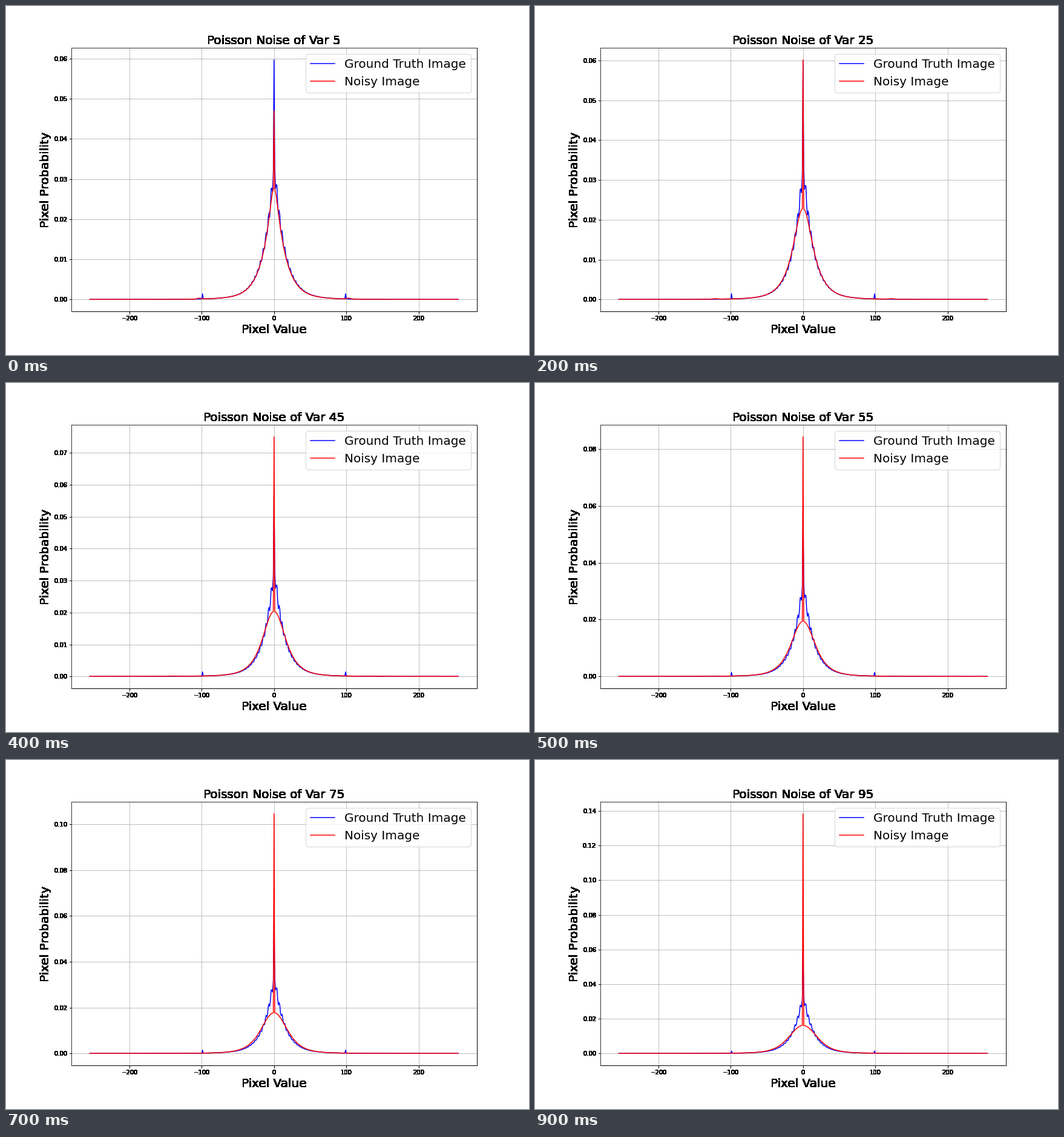
Animation of 864 by 576 pixels, one loop 1 s. Source, as a matplotlib script:

```python
import matplotlib.pyplot as plt
import numpy as np
from matplotlib.animation import FuncAnimation

VARIANCES = range(5, 100, 10)
FRAME_MS = 100
TRUTH_PEAK = .0597

x = np.arange(-255, 256)
dist = np.abs(x)
# Gradient histogram of a natural picture: sharp core plus a faint wide tail.
envelope = .0345 * np.exp(-dist / 14) + .0004 * np.exp(-(dist / 85) ** 2)


def truth_curve():
    ripple = np.cos(2 * np.pi * (dist - .1) / 3.75) * np.exp(-dist / 60)
    curve = envelope * (.985 + .09 * ripple) * (1 + .015 * np.sign(x))
    curve[dist == 99] = .0014
    curve[x == 0] = TRUTH_PEAK
    return curve


def noisy_peak(var):
    """Share of flat pixels, growing roughly exponentially with the noise."""
    keys = [5, 25, 35, 45, 55, 75, 95]
    peaks = [.047, .06017, .067055, .075, .0843, .10457, .1383]
    return np.exp(np.interp(var, keys, np.log(peaks)))


def noisy_curve(var):
    """The truth blurred by noise, with the side spikes spread and pushed out."""
    kernel = np.exp(-(x / (1.32 * np.sqrt(var))) ** 2 / 2)
    body = np.convolve(envelope, kernel, mode="same")
    peak = noisy_peak(var)
    body *= (1 - peak) / body.sum()
    bump = np.exp(-((dist - 99 - .93 * var) / (3 + .1 * var)) ** 2)
    curve = body + .00025 * np.exp(-var / 40) * bump
    curve[x == 0] = peak
    return curve


def harden(image, dpi):
    """Turn every touched pixel fully black, without soft edges."""
    out = np.zeros_like(image)
    out[..., 3] = image[..., 3] > 0
    return out, 0, 0


truth = truth_curve()

plt.rcParams.update({"font.family": "DejaVu Sans", "font.size": 10})
fig, ax = plt.subplots(figsize=(12, 8), dpi=72)
fig.subplots_adjust(left=.125, right=.9, bottom=.125, top=.88)
ax.plot(x, truth, color="blue", label="Ground Truth Image")
noisy_line, = ax.plot(x, truth, color="red", label="Noisy Image")
ax.grid(True)
ax.legend(loc="upper right", fontsize=20)
title = ax.set_title("", fontsize=20)
labels = [ax.set_xlabel("Pixel Value", fontsize=20),
          ax.set_ylabel("Pixel Probability", fontsize=20)]
for artist in [title, *labels, ax.spines["right"], ax.spines["bottom"]]:
    artist.set_agg_filter(harden)


def update(i):
    noisy = noisy_curve(VARIANCES[i])
    noisy_line.set_ydata(noisy)
    top = max(truth.max(), noisy.max())
    ax.set_ylim(-.05 * top, 1.05 * top)
    title.set_text(f"Poisson Noise of Var {VARIANCES[i]}")
    for axis in (ax.xaxis, ax.yaxis):
        for artist in [*axis.get_ticklabels(), *axis.get_ticklines()]:
            artist.set_agg_filter(harden)
    return [noisy_line, title]


anim = FuncAnimation(fig, update, frames=len(VARIANCES), interval=FRAME_MS,
                     repeat=True, repeat_delay=0, blit=False)
plt.show()
```
